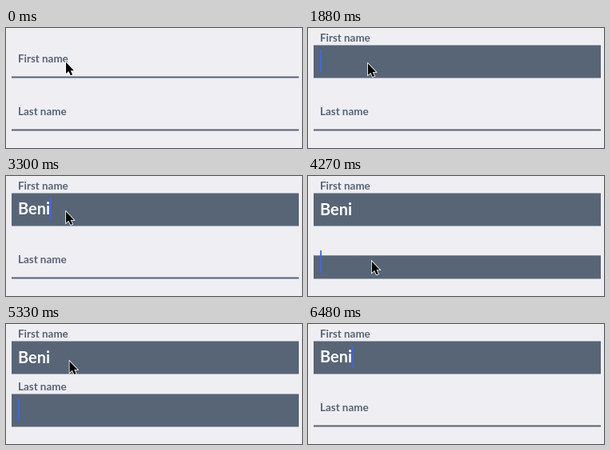
Write an HTML page with a canvas that moves like this. It is 370x150 px and loops after 6840 ms.

```html
<!DOCTYPE html>
<html lang="en">
<head>
<meta charset="utf-8">
<title>Text fields</title>
<style>
  html, body { margin: 0; width: 100%; height: 100%; overflow: hidden; background: #efeef3; }
  canvas { display: block; }
</style>
</head>
<body>
<canvas id="stage" width="370" height="150"></canvas>
<script>
const ctx = document.getElementById('stage').getContext('2d');
const LOOP = 6840, STEP = 88.5, FIRST_STEP = 1530;
const SLATE = '#576576', NAME = 'Beni', ROW = 66;
const KEYS = [2580, 2850, 3030, 3300];

// Moments that restart the caret, with the row it sits in
const carets = [[1530, 0], ...KEYS.map(k => [k, 0]), [4270, 1], [5510, 0]];

// Pointer moves: start, end, from, to
const moves = [
  [0, 114, [74.5, 42], [74.5, 43.7]],
  [3660, 4000, [74.5, 43.7], [79.3, 106]],
  [4900, 5250, [79.3, 106], [79, 45.7]],
  [5800, 6440, [79, 45.7], [320, 152]]
];

const clamp = x => Math.min(1, Math.max(0, x));
const lerp = (a, b, k) => a + (b - a) * k;
const easeOut = x => 1 - (1 - clamp(x)) ** 4;
const smooth = x => x * x * (3 - 2 * x);

function write(text, x, y, size, color) {
  ctx.font = `bold ${size}px Lato, sans-serif`;
  ctx.fillStyle = color;
  ctx.fillText(text, x, y);
  return ctx.measureText(text).width;
}

function field(label, row, open) {
  const top = row * ROW, height = lerp(2, 41, open);
  ctx.fillStyle = SLATE;
  ctx.fillRect(7, top + 62.5 - height, 359, height);
  // The label rests, then rises from behind the panel
  const y = open < 0.5 ? 42.7 : lerp(62, 17, open * 2 - 1);
  write(label, 15, top + y, 13.4, SLATE);
}

function caret(x, row, age) {
  const phase = age % 960;
  ctx.globalAlpha = 1 - clamp((phase - 440) / 260);
  ctx.fillStyle = '#4264ee';
  ctx.fillRect(x, row * ROW + 27, 1.8, 28);
  ctx.globalAlpha = 1;
}

function pointer(s) {
  const [start, end, from, to] = moves.filter(m => s >= m[0]).pop() || moves[0];
  const k = smooth(clamp((s - start) / (end - start)));
  ctx.save();
  ctx.translate(lerp(from[0], to[0], k), lerp(from[1], to[1], k));
  const arrow = new Path2D('M.5 .8V15L3.8 12 6.3 17.3 8.6 16.3 6.2 11.2H10.4Z');
  ctx.lineWidth = 1.6;
  ctx.strokeStyle = '#fff';
  ctx.stroke(arrow);
  ctx.fillStyle = '#000';
  ctx.fill(arrow);
  ctx.restore();
}

function draw(t) {
  // Motion is seen at about 11 steps per second
  const s = FIRST_STEP + Math.floor((t - FIRST_STEP + 8) / STEP) * STEP;
  const lastOpen = s < 5480 ? easeOut((s - 4196) / 300) : 1 - easeOut((s - 5480) / 300);
  ctx.fillStyle = '#efeef3';
  ctx.fillRect(0, 0, 370, 150);
  field('First name', 0, easeOut((s - 1503) / 300));
  field('Last name', 1, lastOpen);

  const active = carets.filter(c => t >= c[0]).pop();
  const typed = NAME.slice(0, KEYS.filter(k => t >= k).length);
  const width = write(typed, 15, active && active[1] ? 48.5 : 48, 20, '#fff');
  if (active) caret(15.2 + (active[1] ? 0 : width), active[1], Math.max(0, s - active[0]));
  pointer(s);
}

function tick() {
  draw(performance.now() % LOOP);
  requestAnimationFrame(tick);
}
tick();
</script>
</body>
</html>
```
